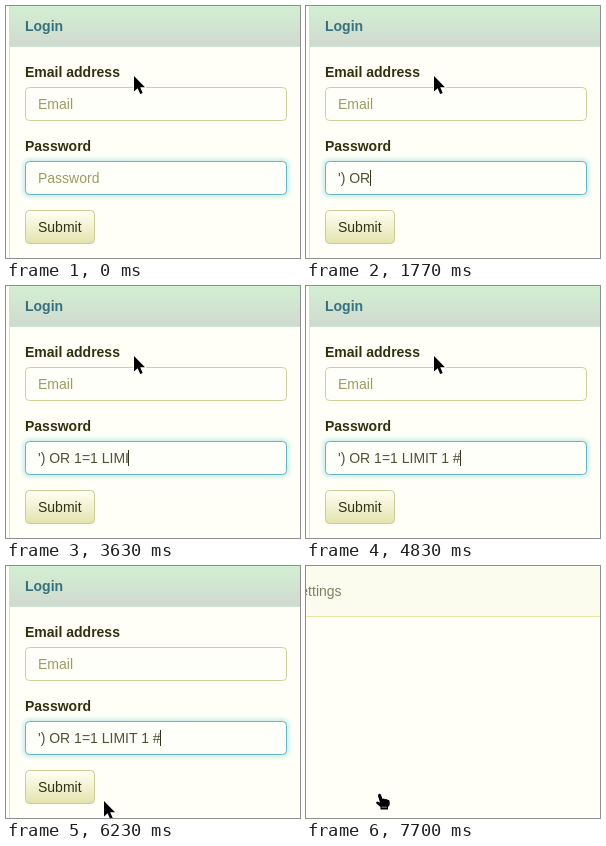
An HTML page that plays this animation: 294 px wide and 252 px high, repeating every 8000 ms.

```html
<!DOCTYPE html>
<html lang="en">
<head>
<meta charset="utf-8">
<title>Login form</title>
<style>
  html, body { margin: 0; width: 100%; height: 100%; overflow: hidden; background: #fffff8; }
  svg { display: block; width: 294px; height: 252px; }
  text { font: 14px "Liberation Sans", Arial, sans-serif; white-space: pre; }
  .label { font-weight: bold; fill: #30300f; }
  .hint { fill: #9c9c62; }
  .box { fill: #fffffa; stroke: #cfcf9c; }
</style>
</head>
<body>
<svg viewBox="0 0 294 252">
  <defs>
    <linearGradient id="head" x2="0" y2="1">
      <stop stop-color="#d2efd2"/><stop offset="1" stop-color="#d0d9cf"/>
    </linearGradient>
    <linearGradient id="face" x2="0" y2="1">
      <stop stop-color="#fffff4"/><stop offset="1" stop-color="#e3e3ae"/>
    </linearGradient>
    <filter id="glow" x="-10%" y="-50%" width="120%" height="200%">
      <feGaussianBlur stdDeviation="2.5"/>
    </filter>
  </defs>

  <g id="login">
    <rect x="3" width="291" height="41" fill="url(#head)"/>
    <path d="M3 40.5H294M3.5 0V252" stroke="#cce4d4" fill="none"/>
    <text x="19" y="25" class="label" style="fill:#36707f">Login</text>

    <text x="19" y="71" class="label">Email address</text>
    <rect x="19.5" y="81.5" width="261" height="33" rx="4" class="box"/>
    <text x="32" y="103" class="hint">Email</text>

    <text x="19" y="145" class="label">Password</text>
    <rect x="19.5" y="155.5" width="261" height="33" rx="4" fill="none" stroke="#9cdcd8" stroke-width="3" filter="url(#glow)"/>
    <rect x="19.5" y="155.5" width="261" height="33" rx="4" fill="#fffffa" stroke="#66b5c4"/>
    <text id="hint" x="32" y="177" class="hint">Password</text>
    <text id="typed" x="32" y="177" fill="#505034"></text>
    <rect id="caret" y="164" width="1" height="16" fill="#333320"/>

    <rect id="button" x="19.5" y="204.5" width="69" height="33" rx="4" fill="url(#face)" stroke="#cccc98"/>
    <text x="32" y="226" fill="#30301c">Submit</text>
  </g>

  <g id="home">
    <rect width="294" height="50" fill="#fbfbee"/>
    <path d="M0 50.5H294" stroke="#e6e6a6"/>
    <text x="-15" y="30" fill="#808060">Settings</text>
  </g>

  <g id="pointer" stroke="#fff" stroke-linejoin="round" paint-order="stroke">
    <path id="arrow" stroke-width="2" d="M0 0V15.5L3.6 12.2L6.2 18L8.7 16.9L6.2 11.3H11Z"/>
    <path id="beam" stroke-width="2" d="M-3 -8H-1L0 -7L1 -8H3V-7H1L.5 -6V6L1 7H3V8H1L0 7L-1 8H-3V7H-1L-.5 6V-6L-1 -7H-3Z"/>
    <g id="hand">
      <path stroke-width="2" d="M-.5 0Q1-1 2 1L3.5 5Q5 4 6 5.3Q7.5 4.4 8.5 5.8Q10.6 5.6 10.7 8V11L9 13V15.5H1.5V13L-2.7 9.5Q-3.4 7.8-1.5 7.6L1 8.5L-1 2Z"/>
      <path d="M2.5 13.2H8" stroke="#aaa" stroke-width=".8" fill="none"/>
    </g>
  </g>
</svg>
<script>
const DURATION = 8000, PAGE_CHANGE = 7570, BLINK = 600;
const phrase = "') OR 1=1 LIMIT 1 #";
const keyTimes = [430, 600, 1000, 1350, 1600, 1900, 2150, 2370, 2570, 2770,
                  3000, 3200, 3400, 3580, 3770, 3950, 4150, 4400, 4650];
// time, x, y
const path = [[0, 128, 70], [5450, 128, 70], [6200, 98, 235], [6350, 98, 235], [6720, 73, 228], [DURATION, 73, 228]];

const $ = id => document.getElementById(id);
const show = (id, on) => { $(id).style.display = on ? "" : "none"; };
const ease = u => u * u * (3 - 2 * u);
const inside = ([x, y], left, top, right, bottom) => x >= left && x <= right && y >= top && y <= bottom;

function pointerAt(t) {
  const i = path.findIndex((step, n) => n && t <= step[0]);
  const [a, b] = [path[i - 1], path[i]];
  const u = ease((t - a[0]) / (b[0] - a[0]));
  return [1, 2].map(k => Math.round(a[k] + (b[k] - a[k]) * u));
}

function draw(t) {
  const count = keyTimes.filter(k => k <= t).length;
  const lastKey = count ? keyTimes[count - 1] : -BLINK;
  const typed = $("typed");
  typed.textContent = phrase.slice(0, count);
  show("hint", !count);
  show("login", t < PAGE_CHANGE);
  show("home", t >= PAGE_CHANGE);
  show("caret", Math.floor((t - lastKey) / BLINK) % 2 === 0);
  const width = count && t < PAGE_CHANGE ? typed.getComputedTextLength() : 0;
  $("caret").setAttribute("x", Math.floor(32 + width));

  const p = pointerAt(t);
  const onButton = inside(p, 19, 204, 89, 238);
  const onField = inside(p, 19, 81, 281, 115) || inside(p, 19, 155, 281, 189);
  $("pointer").setAttribute("transform", `translate(${p})`);
  show("hand", onButton);
  show("beam", onField);
  show("arrow", !onButton && !onField);
  $("button").setAttribute("fill", onButton ? "#e3e3b4" : "url(#face)");
}

const start = performance.now();
function tick() {
  draw((performance.now() - start) % DURATION);
  requestAnimationFrame(tick);
}
tick();
</script>
</body>
</html>
```
